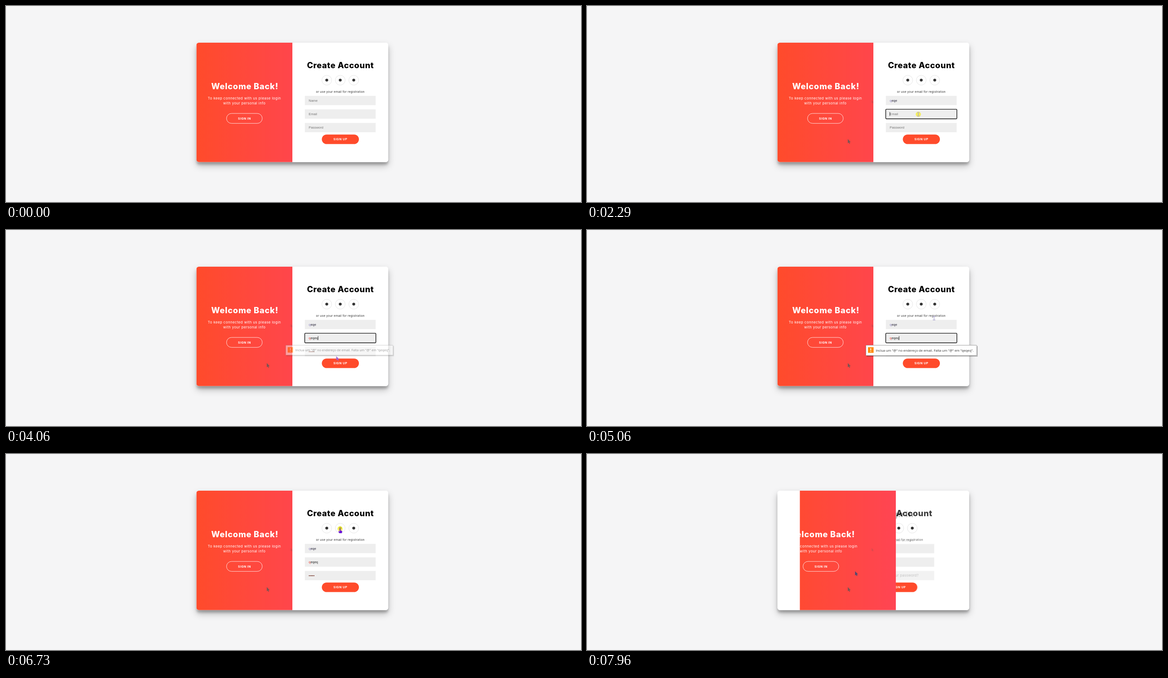
An HTML page that plays this animation: 1279 px wide and 438 px high, repeating every 8 s.

```html
<!DOCTYPE html>
<html lang="en">
<head>
<meta charset="utf-8">
<title>Create Account</title>
<style>
  html, body { margin: 0; width: 100%; height: 100%; overflow: hidden; background: #f5f5f6; }
  #shadow {
    position: absolute; left: 423.5px; top: 82px; width: 426.7px; height: 266.7px;
    border-radius: 5.5px;
    box-shadow: 0 7.8px 15.6px rgba(0,0,0,.25), 0 5.5px 5.5px rgba(0,0,0,.22);
  }
  svg { position: absolute; left: 0; top: 0; display: block; }
  text { font-family: Inter, "Open Sans", sans-serif; white-space: pre; }
  .mid { text-anchor: middle; }
  .title { font-size: 18.2px; font-weight: 800; letter-spacing: .6px; }
  .lead { font-size: 7.8px; letter-spacing: .45px; fill: #fff; }
  .small { font-size: 6.7px; letter-spacing: .16px; fill: #333; }
  .label { font-size: 6.7px; font-weight: 700; letter-spacing: .55px; fill: #fff; }
  .field { font: 7.4px "Liberation Sans", Arial, sans-serif; }
  .hint { fill: #757575; }
  .tip { font: 7.4px "Open Sans", "Noto Sans", sans-serif; fill: #333; }
</style>
</head>
<body>
<div id="shadow"></div>
<svg width="1279" height="438" viewBox="0 0 1279 438">
  <defs>
    <linearGradient id="fire" gradientUnits="userSpaceOnUse" x1="423.5" y1="0" x2="850.2" y2="0">
      <stop offset="0" stop-color="#ff4b2b"/><stop offset="1" stop-color="#ff416c"/>
    </linearGradient>
    <clipPath id="card"><rect x="423.5" y="82" width="426.7" height="266.7" rx="5.5"/></clipPath>
    <clipPath id="pane"><rect id="paneRect" x="423.5" y="82" width="213.5" height="267"/></clipPath>
    <path id="arrow" d="M0 0V9.5L2.2 7.6L3.6 10.6L5.2 9.9L3.9 7H6.6Z"/>
  </defs>

  <g clip-path="url(#card)">
    <rect x="423" y="82" width="428" height="267" fill="#fff"/>
    <g id="forms">
      <g id="signIn"></g>
      <g id="signUp"></g>
    </g>
    <g clip-path="url(#pane)">
      <rect x="423" y="82" width="428" height="267" fill="url(#fire)"/>
      <g id="welcome" fill="#fff">
        <text class="mid title" style="letter-spacing:.8px" x="531.2" y="185.5">Welcome Back!</text>
        <text class="mid lead" x="530.2" y="209.3">To keep connected with us please login</text>
        <text class="mid lead" x="530.2" y="220.3">with your personal info</text>
        <rect x="490.5" y="240.1" width="79.5" height="22.2" rx="11.1" fill="none" stroke="#fff" stroke-width=".8"/>
        <text class="mid label" x="530.5" y="253.5">SIGN IN</text>
      </g>
    </g>
  </g>

  <g id="bubble">
    <rect x="622" y="259.5" width="247" height="23.5" fill="#000" opacity=".25"/>
    <rect x="620.5" y="257.5" width="246.5" height="23" rx="1" fill="#fff" stroke="#888" stroke-width=".8"/>
    <rect x="625" y="262" width="12.5" height="12.5" fill="#ff8c0a"/>
    <path d="M631.2 264v5" stroke="#fff" stroke-width="1.7"/>
    <circle cx="631.2" cy="271.6" r="1" fill="#fff"/>
    <text class="tip" x="642.5" y="271.6">Inclua um "@" no endereço de email. Falta um "@" em "qeqeq".</text>
  </g>

  <use id="trailA" href="#arrow" x="580" y="297.3" fill="#555" opacity=".75"/>
  <use id="trailB" href="#arrow" transform="translate(633 210) scale(.75)" fill="#555" opacity=".2"/>

  <g id="cursor">
    <circle id="press" r="5.8" fill="#f5ee2e" opacity=".75"/>
    <use id="pointer" href="#arrow"/>
    <path id="beam" d="M-2.8 -4H2.8M0 -4V4M-2.8 4H2.8" fill="none" stroke="#aaa2cf" stroke-width="1.2"/>
    <path id="hand" d="M-1 0Q0 -1 1 0V4L4.3 4.8Q5 5 4.8 6.2L4 10H-1.4L-3.8 6.4Q-3.6 5 -2.4 5.6L-1 6.8Z" fill="#6a16d8"/>
  </g>
</svg>

<script>
const LOOP = 8000;
const CARD_HALF = 213.4;
const SLIDE_START = 7760, SLIDE_TIME = 600;
const FIELD_X = 673.3, CHAR = 7.4 * .556, BULLET = 7.4 * .35;
const $ = id => document.getElementById(id);
const clamp = v => Math.min(1, Math.max(0, v));
const ramp = (t, from, to) => clamp((t - from) / (to - from));
const show = (id, on) => $(id).setAttribute("visibility", on ? "visible" : "hidden");
const shift = (id, x, y = 0) => $(id).setAttribute("transform", `translate(${x} ${y})`);

const fields = [
  { hint: "Name", y: 200.8, text: "qeqe", step: CHAR, type: [1820, 2110], focus: [[1460, 2240]], tint: "#8c82bd", ink: "#222034" },
  { hint: "Email", y: 231, text: "qeqeq", step: CHAR, type: [2300, 2570], focus: [[2240, 2970], [3930, 6090]], tint: "#e5382c", ink: "#222" },
  { hint: "Password", y: 261.3, text: "•••••", step: BULLET, type: [3140, 3460], focus: [[2970, 3800]], tint: "#6b2618", ink: "#6b2618" }
];

// Cursor stops: time, x, y, shape
const route = [
  [120, 1017, 401, "pointer"], [690, 580, 297, "pointer"], [920, 607, 259, "pointer"],
  [1190, 634, 210, "pointer"], [1360, 717, 210, "beam"], [1570, 720, 209, "beam"],
  [2060, 720, 211, "beam"], [2220, 737, 242, "beam"], [2600, 737, 242, "beam"],
  [2840, 684, 266, "beam"], [3480, 684, 266, "beam"], [3720, 744, 297, "hand"],
  [3920, 744, 297, "hand"], [4060, 735, 282, "pointer"], [4560, 527, 248, "hand"],
  [4690, 527, 248, "hand"], [4830, 625, 243, "pointer"], [5060, 772, 197, "beam"],
  [5270, 781, 240, "beam"], [5480, 781, 240, "beam"], [5660, 773, 166, "hand"],
  [5800, 713, 166, "hand"], [5900, 743, 167, "hand"], [6310, 743, 167, "hand"],
  [6500, 714, 167, "hand"], [6700, 743, 167, "hand"], [6800, 743, 167, "hand"],
  [7080, 773, 167, "hand"], [7200, 743, 185, "pointer"], [7520, 531, 250, "hand"],
  [7770, 531, 250, "hand"], [7960, 596, 262, "pointer"], [8000, 608, 264, "pointer"]
];
const clicks = [1450, 2230, 2970, 3800, 6080, 6720, 7740];

const box = y => `<rect x="664.8" y="${y}" width="157.5" height="20.8" fill="#eee"/>`;
const pill = (x, w, label) =>
  `<rect x="${x}" y="287.2" width="${w}" height="21.3" rx="10.65" fill="#ff4b2b"/>
   <text class="mid label" x="743.8" y="300.2">${label}</text>`;
const formTop = (title, note, dy) =>
  `<rect x="637" y="82" width="214" height="267" fill="#fff"/>
   <text class="mid title" x="743.9" y="${139 + dy}">${title}</text>` +
  [713.5, 743.5, 773.5].map(x =>
    `<circle cx="${x}" cy="165.8" r="10.9" fill="none" stroke="#ddd" stroke-width=".8"/>
     <circle cx="${x}" cy="165.6" r="3.2" fill="#333"/>`).join("") +
  `<text class="mid small" x="743.6" y="${194.3 + dy}">${note}</text>`;

$("signIn").innerHTML = formTop("Sign in", "or use your account", 1.5) + box(201.8) + box(232) +
  `<text class="mid small" style="font-size:7.8px" x="743.6" y="274.2">Forgot your password?</text>` +
  pill(703.7, 80, "SIGN IN");

$("signUp").innerHTML = formTop("Create Account", "or use your email for registration", 0) +
  fields.map((f, i) => {
    const base = f.y + 13;
    return box(f.y) +
      `<text class="field hint" id="hint${i}" x="${FIELD_X}" y="${base}">${f.hint}</text>
       <text class="field" x="${FIELD_X}" y="${base}">` +
      `<tspan id="first${i}" fill="${f.tint}"></tspan><tspan id="rest${i}" fill="${f.ink}"></tspan></text>
       <g id="focus${i}">
         <rect x="664.5" y="${f.y - .4}" width="158.2" height="21.6" rx="1.6" fill="none" stroke="#111" stroke-width="1.4"/>
         <path id="caret${i}" d="M0 ${f.y + 6}v8.6" stroke="#111" stroke-width=".8"/>
       </g>`;
  }).join("") + pill(702.5, 82.5, "SIGN UP");

// CSS ease-in-out, cubic-bezier(.42, 0, .58, 1)
function easeInOut(x) {
  let low = 0, high = 1;
  for (let i = 0; i < 20; i++) {
    const s = (low + high) / 2, r = 1 - s;
    if (1.26 * r * r * s + 1.74 * r * s * s + s * s * s < x) low = s; else high = s;
  }
  return low * low * (3 - 2 * low);
}

function drawFields(t) {
  fields.forEach((f, i) => {
    const count = t < f.type[0] ? 0 : 1 + Math.round(ramp(t, ...f.type) * (f.text.length - 1));
    const typed = f.text.slice(0, count);
    $("first" + i).textContent = typed.slice(0, 1);
    $("rest" + i).textContent = typed.slice(1);
    show("hint" + i, !typed);
    show("focus" + i, f.focus.some(([from, to]) => t >= from && t < to));
    shift("caret" + i, FIELD_X + .3 + count * f.step);
  });
}

function drawBubble(t) {
  const grow = ramp(t, 3980, 4150), alpha = grow * (1 - ramp(t, 6070, 6210));
  const scale = .94 + .06 * grow;
  $("bubble").setAttribute("opacity", alpha);
  $("bubble").setAttribute("transform", `translate(675 256) scale(${scale}) translate(-675 -256)`);
}

function drawCursor(t) {
  show("trailA", t >= 700);
  show("trailB", t >= 1200);
  const next = route.findIndex(stop => stop[0] > t);
  const visible = next > 0;
  const [t0, x0, y0, shape0] = route[Math.max(0, next - 1)];
  const [t1, x1, y1, shape1] = route[Math.max(0, next)];
  const k = ramp(t, t0, t1);
  shift("cursor", x0 + (x1 - x0) * k, y0 + (y1 - y0) * k);
  const shape = k < .6 ? shape0 : shape1;
  for (const id of ["pointer", "beam", "hand"]) show(id, visible && id === shape);
  $("pointer").setAttribute("fill", t < 7700 ? "#a162cf" : "#4c4a70");
  show("press", visible && clicks.some(c => t >= c && t < c + 110));
}

function drawSlide(t) {
  const p = easeInOut(ramp(t, SLIDE_START, SLIDE_START + SLIDE_TIME));
  $("paneRect").setAttribute("x", 423.5 + CARD_HALF * p);
  shift("forms", -CARD_HALF * p);
  shift("welcome", -CARD_HALF * .2 * p);
  $("signUp").setAttribute("opacity", 1 - p);
  show("signIn", p > 0);
}

function draw(t) {
  drawFields(t);
  drawBubble(t);
  drawCursor(t);
  drawSlide(t);
}

const start = performance.now();
function frame() {
  draw((performance.now() - start) % LOOP);
  requestAnimationFrame(frame);
}
draw(0);
requestAnimationFrame(frame);
</script>
</body>
</html>
```
